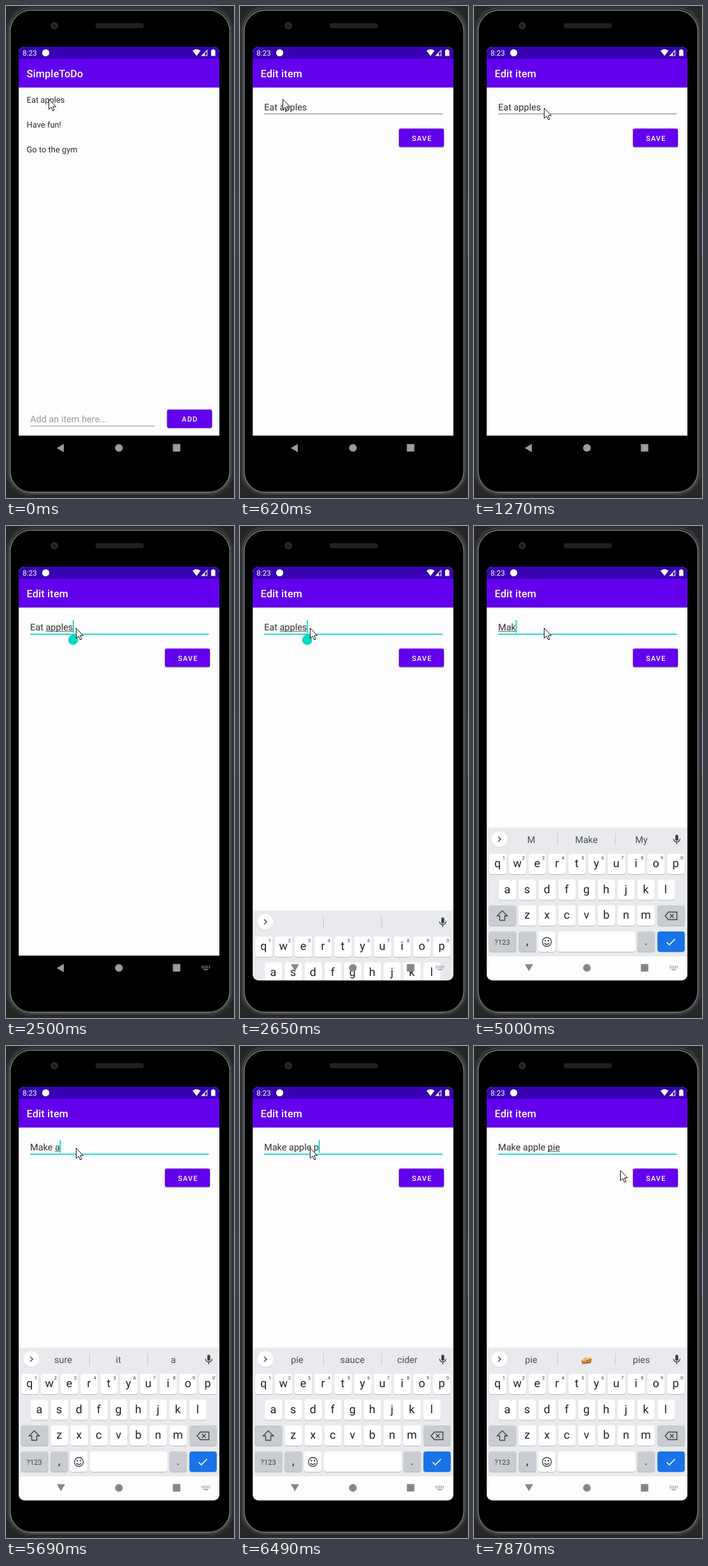
Animation of 359 by 773 pixels, one loop 8000 ms. Source, as an HTML page:

```html
<!DOCTYPE html>
<html lang="en">
<head>
<meta charset="utf-8">
<title>To-do item editing</title>
<style>
  html, body { margin: 0; width: 100%; height: 100%; overflow: hidden; background: #262626; }
  svg { display: block; width: 359px; height: 773px; }
  text { font-family: Roboto, sans-serif; white-space: pre; text-rendering: geometricPrecision; }
  .title { font-size: 16.3px; font-weight: 500; letter-spacing: .13px; fill: #fff; }
  .item { font-size: 12.9px; fill: #2a2a2a; }
  .input { font-size: 14.5px; fill: #303030; }
  .button { font-size: 11.3px; font-weight: 500; letter-spacing: 1px; fill: #fff; }
  .mid { text-anchor: middle; }
  .hint { font-size: 14.5px; fill: #4a4d51; }
  .key { font-size: 18px; fill: #202124; }
  .digit { font-size: 7.5px; font-weight: 500; fill: #5f6368; }
  .line { fill: none; stroke: #3c4043; stroke-width: 1.4; }
</style>
</head>
<body>
<svg viewBox="0 0 359 773">
  <defs>
    <clipPath id="screen"><rect x="20" y="64" width="316" height="650" rx="9"/></clipPath>
    <g id="bars">
      <rect x="20" y="64" width="316" height="611" fill="#fdfdfd"/>
      <rect x="20" y="64" width="316" height="19" fill="#3700b3"/>
      <rect x="20" y="83" width="316" height="45" fill="#6200ee"/>
      <rect x="20" y="128" width="316" height="1" fill="#000" opacity=".12"/>
    </g>
    <g id="box">
      <rect y="1.5" width="71" height="29" rx="3.2" fill="#000" opacity=".2"/>
      <rect width="71" height="29" rx="3.2" fill="#6200ee"/>
    </g>
  </defs>

  <!-- phone body -->
  <rect width="359" height="773" fill="#262626"/>
  <rect x="356" y="297" width="3" height="99" fill="#47484b"/>
  <rect x="1.5" y="0" width="356" height="769.5" rx="37" fill="#111" stroke="#303134" stroke-width="2"/>
  <rect x="4" y="3" width="351" height="763.5" rx="35" fill="none" stroke="#404145" stroke-width="3"/>
  <rect x="6.5" y="6.5" width="346" height="757.5" rx="33" fill="#000" stroke="#686a6e" stroke-width="2"/>
  <rect x="141" y="27" width="76" height="8" rx="4" fill="#202020"/>
  <circle cx="76" cy="31" r="5.8" fill="#2b2b2e"/>
  <circle cx="76" cy="31" r="2.8" fill="#15182c"/>

  <g clip-path="url(#screen)">
    <g id="list">
      <use href="#bars"/>
      <text class="title" x="32.5" y="112">SimpleToDo</text>
      <text class="item" x="32.6" y="152.2">Eat apples</text>
      <text class="item" x="32.6" y="190.9">Have fun!</text>
      <text class="item" x="32.6" y="229.6">Go to the gym</text>
      <text class="input" x="38" y="654" style="fill:#9a9a9a">Add an item here...</text>
      <rect x="38" y="659.5" width="196" height="1" fill="#8a8a8a"/>
      <use href="#box" x="253.5" y="634"/>
      <text class="button mid" x="289.5" y="653">ADD</text>
    </g>

    <g id="edit">
      <use href="#bars"/>
      <text class="title" x="32.5" y="112">Edit item</text>
      <rect id="rule" x="38" width="281.3"/>
      <text class="input" id="field" x="38" y="163.6"></text>
      <rect id="under" y="165" height="1" fill="#6a6a6a"/>
      <rect id="caret" y="148" width="1.8" height="20" fill="#03dac5"/>
      <path id="handle" d="M0 0L5.6 4.4A7.9 7.9 0 1 1-5.6 4.4Z" fill="#03dac5"/>
      <use href="#box" x="250.2" y="192.6"/>
      <text class="button mid" x="286.5" y="211.6">SAVE</text>
    </g>

    <g id="board">
      <rect x="20" y="474" width="316" height="202" fill="#e8eaed"/>
      <rect x="20" y="676" width="316" height="38" fill="#fdfdfd"/>
      <circle cx="40" cy="492.7" r="12.5" fill="#c8cbd0"/>
      <circle cx="40" cy="492" r="12.5" fill="#fff"/>
      <path class="line" d="M38 488l4 4-4 4"/>
      <path d="M131.5 483v19M223 483v19" stroke="#c3c6ca"/>
      <g class="hint mid">
        <text x="90" y="498"></text><text x="177" y="498"></text><text x="263.5" y="498"></text>
      </g>
      <g id="apple">
        <path d="M176 488c-9-4-9 13-1 12.5q1.5-.8 3 0c8 .5 8-16.5-2-12.5Z" fill="#dd2e35"/>
        <path d="M176 489q-1-3 1-4" fill="none" stroke="#6d3b22"/>
        <path d="M177 487q1-4 5-3-1 3-5 3Z" fill="#6b9e3d"/>
        <circle cx="173" cy="491" r="1.6" fill="#f28a83"/>
      </g>
      <g id="pie">
        <path d="M169 495l10-8 6 5-1 6-13 2Z" fill="#a85b25"/>
        <path d="M169 494l10-8 6 5-13 5Z" fill="#efb76a"/>
        <path d="M171 497l12-4v3l-12 3Z" fill="#d48a3c"/>
        <circle cx="179" cy="488" r="2.5" fill="#f7ead5"/>
      </g>
      <g fill="#3c4043">
        <rect x="317" y="485" width="4.6" height="9.5" rx="2.3"/>
        <path class="line" d="M314.3 491.5a5 5 0 0 0 10 0M319.3 496.5v3.5"/>
      </g>
      <g id="keys"></g>
      <path class="line" d="M44.5 604.5l-8 8h4v7h8v-7h4Z"/>
      <path class="line" d="M306 606.5h13.5v12h-13.5l-5-6ZM308.5 609.5l6 6m0-6l-6 6"/>
      <circle class="line" cx="114.7" cy="653.5" r="7"/>
      <path class="line" d="M110.8 655.5q3.9 4 7.8 0"/>
      <circle cx="112.2" cy="651.5" r="1.1"/><circle cx="117.2" cy="651.5" r="1.1"/>
      <path class="line" d="M303.5 654l4 4 9-9" style="stroke:#fff;stroke-width:1.6"/>
      <text class="mid" x="44.5" y="658" font-size="11.3" fill="#3c4043">?123</text>
    </g>

    <g id="nav">
      <path id="back"/>
      <circle cx="177.8" cy="694.3" r="6"/>
      <rect x="262.7" y="688.3" width="11.8" height="11.8" rx="1"/>
      <path id="picker" d="M308 691.7h13M308 694.3h13" stroke-width="1.5" stroke-dasharray="1.6 1.25"/>
      <rect id="spacebar" x="311" y="696.3" width="7" height="1.4"/>
    </g>

    <g fill="#fff">
      <text x="26" y="78" font-size="11.7">8:23</text>
      <circle cx="62.5" cy="73.5" r="5.6"/>
      <path d="M300 78.5l-6.3-8.2q6.3-4.6 12.6 0Z"/>
      <path d="M317 68.5v10h-10ZM316 71l-3 3v3.5h3Z" fill-rule="evenodd"/>
      <path d="M323 69.3h2v-1.3h2.6v1.3h2v9.3h-6.6Z"/>
    </g>
  </g>

  <path id="mouse" d="M.5.5V16.5l3.7-3.5 2.6 5.8 2.4-1-2.5-5.6h5Z" fill="#fff" stroke="#111"/>
</svg>

<script>
const $ = id => document.getElementById(id);
const LOOP = 8000;

// keyboard
let keys = '';
function key(x, y, w, fill, label = '', digit = '') {
  const rect = (dy, f) => `<rect x="${x}" y="${y + dy}" width="${w}" height="32" rx="4" fill="${f}"/>`;
  keys += rect(1, '#b4b7bc') + rect(0, fill) +
    `<text class="key mid" x="${x + w / 2 - .4}" y="${y + 21}">${label}</text>` +
    `<text class="digit mid" x="${x + w - 4.5}" y="${y + 8.8}">${digit}</text>`;
}
const GREY = '#c9ccd1', PITCH = 31.15, KEY = 27.6;
[['qwertyuiop', 23.7, 515], ['asdfghjkl', 39.1, 555.5], ['zxcvbnm', 70.3, 596]].forEach(([row, x, y]) =>
  [...row].forEach((c, i) => key(x + i * PITCH, y, KEY, '#fff', c, y === 515 ? (i + 1) % 10 : '')));
key(23.5, 596, 43, GREY);
key(288.8, 596, 43, GREY);
key(23.5, 637, 43, GREY);
key(70.3, 637, KEY, GREY, ',');
key(101, 637, KEY, '#fff');
key(132, 637, 122, '#fff');
key(257.3, 637, KEY, GREY, '.');
key(288.8, 637, 43, '#1a73e8');
$('keys').innerHTML = keys;

// each step changes part of the state from its time on
const steps = [
  [0, { text: 'Eat apples', mouse: [67, 146], list: 1, fade: 0, scale: 1, drop: 240, words: ',,' }],
  [500, { fade: .6, scale: .95 }],
  [620, { fade: 1, scale: 1, list: 0 }],
  [890, { mouse: [74, 148] }],
  [1010, { mouse: [88, 153] }],
  [1140, { mouse: [102, 158] }],
  [1270, { mouse: [110, 160] }],
  [2240, { focus: 1, caret: 1 }],
  [2370, { handle: 1, under: 1 }],
  [2500, { picker: 1 }],
  [2650, { drop: 130 }],
  [2780, { drop: 20 }],
  [2920, { drop: 0, words: 'apples,*apple,apple' }],
  [3350, { handle: 0 }],
  [3500, { text: 'Eat apple' }],
  [3650, { words: 'apple,*apple,apples' }],
  [3770, { text: 'Eat ap', words: 'apple,*apple,application' }],
  [3900, { text: 'Eat ', words: 'a,at,app' }],
  [4040, { text: '', words: 'I,The,I\'m' }],
  [4570, { caret: 0 }],
  [4860, { text: 'M', caret: 1 }],
  [5000, { text: 'Mak', words: 'M,Make,My' }],
  [5150, { text: 'Make', words: 'Mak,Make,Making' }],
  [5290, { text: 'Make ', words: 'Make,Makes,Making' }],
  [5420, { words: 'sure,it,a' }],
  [5560, { text: 'Make a' }],
  [5700, { text: 'Make ap', words: 'a,an,all' }],
  [5830, { text: 'Make app', words: 'app,apple,application' }],
  [5970, { text: 'Make appl', words: 'apple,*apple,application' }],
  [6090, { text: 'Make apple ', words: 'apple,*apple,apples' }],
  [6210, { words: 'pie,sauce,cider' }],
  [6490, { text: 'Make apple p', under: 0 }],
  [6640, { text: 'Make apple pi', under: 1, words: 'p,pie,pies' }],
  [6890, { text: 'Make apple pie', words: 'pi,pie,pies' }],
  [7010, { words: 'pie,*pie,pies' }],
  [7440, { caret: 0 }],
  [7720, { mouse: [190, 184] }],
  [7870, { mouse: [230, 195] }]
];

function set(id, attrs) {
  for (const name in attrs) $(id).setAttribute(name, attrs[name]);
}
const show = (id, on) => set(id, { visibility: on ? 'visible' : 'hidden' });
const slots = document.querySelectorAll('.hint text');
const field = $('field');

function draw(time) {
  const s = Object.assign({}, ...steps.filter(([t]) => t <= time).map(step => step[1]));
  show('list', s.list);
  set('edit', {
    opacity: s.fade,
    transform: `translate(178 389) scale(${s.scale}) translate(-178 -389)`
  });
  set('rule', s.focus ? { y: 169.2, height: 1.7, fill: '#03dac5' } : { y: 169, height: 1, fill: '#7b7b7b' });

  field.textContent = s.text;
  const width = s.text ? field.getComputedTextLength() : 0;
  const start = s.text.lastIndexOf(' ') + 1;
  const skip = start ? field.getSubStringLength(0, start) : 0;
  set('under', { x: 38 + skip, width: s.under ? Math.max(0, width - skip) : 0 });
  set('caret', { x: 37.7 + width });
  show('caret', s.caret);
  set('handle', { transform: `translate(${38.4 + width} 169)` });
  show('handle', s.handle);

  const up = s.drop < 240;
  show('board', up);
  set('board', { transform: `translate(0 ${s.drop})` });
  s.words.split(',').forEach((w, i) => slots[i].textContent = w[0] === '*' ? '' : w);
  for (const id of ['apple', 'pie']) set(id, { display: s.words.includes('*' + id) ? 'inline' : 'none' });

  const tone = up ? '#85878a' : '#9c9c9c';
  set('nav', { fill: tone });
  set('back', { d: up ? 'M80 688.5h13l-6.5 11Z' : 'M91 688v13l-11-6.5Z' });
  set('picker', { stroke: tone });
  show('picker', s.picker);
  show('spacebar', s.picker);
  set('mouse', { transform: `translate(${s.mouse})` });
}

const begin = performance.now();
function tick() {
  draw((performance.now() - begin) % LOOP);
  requestAnimationFrame(tick);
}
tick();
</script>
</body>
</html>
```
